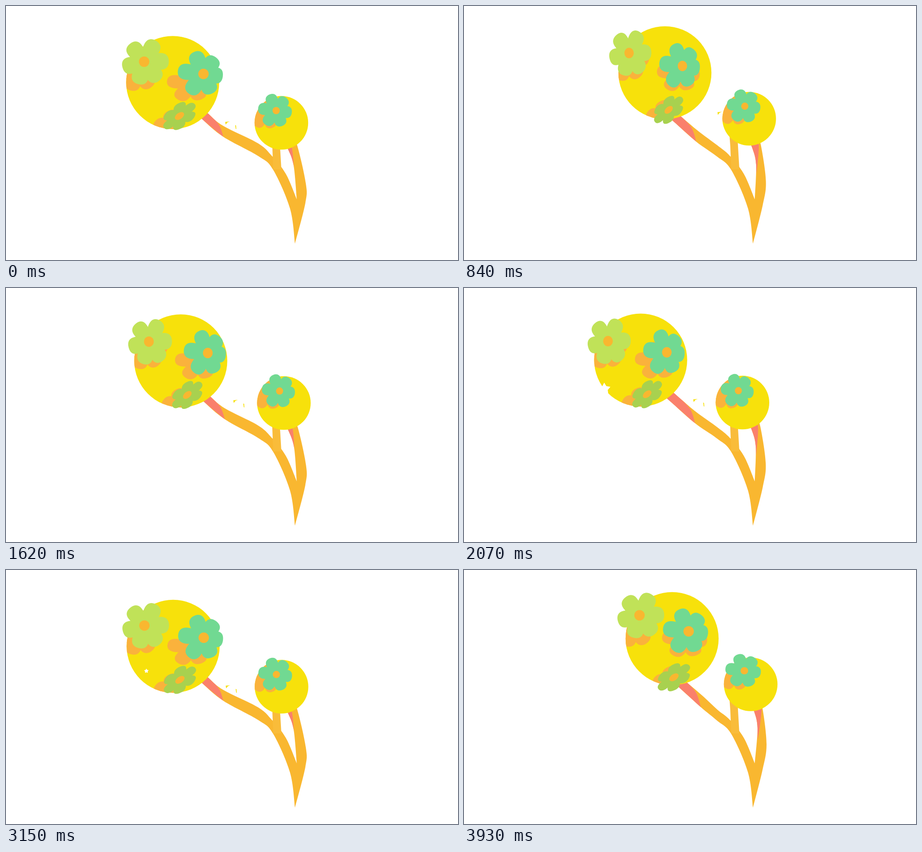
An HTML page with a canvas for the animation above (3990 ms loop, 998x561 px).

```html
<!DOCTYPE html>
<html lang="en">
<head>
<meta charset="utf-8">
<title>Swaying blossoms</title>
<style>
html, body { margin: 0; width: 100%; height: 100%; overflow: hidden; background: #fff; }
canvas { display: block; }
</style>
</head>
<body>
<canvas id="stage" width="998" height="561"></canvas>
<script>
const ctx = document.getElementById('stage').getContext('2d');
const LOOP = 3990;
const YELLOW = '#f7e10b', STEM = '#f9b730', STUB = '#f9bc3a', PINK = '#fa806c', SHADE = '#fab23c';

// Eased moves [start, end] in ms, alternately to the right and back to the left
const SWAY = [[0, 1230], [1230, 1750], [1870, 2590], [2670, 3180], [3200, 3930]];
const BEND = [[0, 1230], [1230, 1700], [1700, 2280], [2500, 3120], [3200, 3930]];
const SPARKS = [1920, 3114];

// Poses: [x, y] at the left, at the top of the arc and at the right
const BALL = [[368, 169], [426, 143], [459.5, 151.5]];
const SMALL = [[608, 258], [626, 245], [633, 252.5]];

const LIME = {
  color: '#c0e258', r: 52, turn: -8, wobble: 8, lean: -.05, dot: 11.5,
  pose: [[305, 123], [339, 108], [387.5, 100]], shade: [[288, 137], [341, 110], [371, 119]]
};
const TEAL = {
  color: '#71d992', r: 50, turn: 7, lean: .14, dot: 11.5, flat: .82,
  pose: [[436, 150], [467, 129], [496, 135.5]], shade: [[412, 171], [464, 144], [494, 153]]
};
const GREEN = {
  color: '#a8d14f', r: 43, turn: -6, lean: 0, dot: 11.5, tilt: -.61, squash: .6,
  pose: [[383, 243], [439, 221], [463.5, 237]], shade: [[360, 260], [417, 234], [451, 243]]
};
const MINI = {
  color: TEAL.color, r: 37.5, turn: 8, lean: .07, dot: 8,
  pose: [[596.5, 231], [621, 220], [619, 222.5]], shade: [[575, 235], [595, 223], [600, 229]]
};

// Stem edges: [x, y] fixed, or [x, y, x, y] from left bend to right bend
const LOWER = [[397, 214, 442, 232], [432, 249, 472, 257], [480, 289, 523, 303],
  [558, 332], [590, 362], [627, 447], [638, 525]];
const OUTER = [[638, 525], [661, 435, 659, 442], [662, 392, 668, 385], [643, 308, 659, 305], [630, 284, 650, 283]];
const INNER = [[608, 290, 628, 288], [622, 315, 640, 311], [635, 352, 648, 350], [642, 427]];
const UPPER = [[642, 427], [618, 371], [587, 331], [556, 303, 560, 309],
  [480, 265, 528, 279], [447, 238, 493, 249], [412, 203, 463, 224]];
const BLUSH = [[480, 289, 523, 303], [470, 262, 513, 272], [447, 238, 493, 249], [412, 203, 463, 224]];
const BLUSH_SMALL = [[636, 357, 649, 376], [631, 312, 657, 308], [620, 290, 650, 283]];

const mix = (a, b, k) => a + (b - a) * k;

function ease(u) {
  u = Math.min(1, Math.max(0, u));
  return u * u * (3 - 2 * u);
}

const swing = (moves, t) =>
  moves.reduce((k, [a, b], i) => k + (i % 2 ? -1 : 1) * ease((t - a) / (b - a)), 0);

// Value between three keys; s runs from 0 to 2
function pick(keys, s) {
  const i = s < 1 ? 0 : 1;
  return mix(keys[i], keys[i + 1], s - i);
}

const place = (pose, s) => [0, 1].map(axis => pick(pose.map(p => p[axis]), s));

// Closed outline: a smooth curve through each edge, sharp joins between them
function outline(k, ...edges) {
  const path = new Path2D();
  edges.forEach((edge, n) => {
    const p = edge.map(([x, y, x1 = x, y1 = y]) => [mix(x, x1, k), mix(y, y1, k)]);
    path[n ? 'lineTo' : 'moveTo'](...p[0]);
    for (let i = 1; i < p.length; i++) {
      const a = p[i - 1], b = p[i], before = p[i - 2] || a, after = p[i + 1] || b;
      path.bezierCurveTo(
        a[0] + (b[0] - before[0]) / 6, a[1] + (b[1] - before[1]) / 6,
        b[0] - (after[0] - a[0]) / 6, b[1] - (after[1] - a[1]) / 6, ...b);
    }
  });
  path.closePath();
  return path;
}

function fill(color, path) {
  ctx.fillStyle = color;
  ctx.fill(path);
}

function polygon(points) {
  const path = new Path2D();
  points.forEach(p => path.lineTo(...p));
  path.closePath();
  return path;
}

function disc([x, y], r) {
  const path = new Path2D();
  path.arc(x, y, r, 0, Math.PI * 2);
  return path;
}

function layer(draw) {
  ctx.save();
  draw();
  ctx.restore();
}

function petal(r, w) {
  const p = new Path2D();
  for (const side of [-w, w]) {
    p.moveTo(0, 0);
    p.bezierCurveTo(r * .25, side * .75, r * .4, side, r * .66, side);
    p.bezierCurveTo(r * .88, side, r, side * .65, r, 0);
    p.lineTo(0, 0);
  }
  return p;
}

// Six petals; lean lengthens those on the left, wobble crowds them
function petals({ r, turn, lean, wobble = 0, tilt = 0, squash = 1 }, color) {
  ctx.rotate(tilt);
  ctx.scale(1, squash);
  for (let deg = 0; deg < 360; deg += 60) {
    const a = (deg + turn + wobble * Math.cos((deg + 30) * Math.PI / 180)) * Math.PI / 180;
    layer(() => {
      ctx.rotate(a);
      fill(color, petal(r * (1 - lean * Math.cos(a)), r * .355));
    });
  }
}

function flower(f, s, sx) {
  layer(() => {
    ctx.translate(...place(f.pose, s));
    ctx.scale(sx, 1);
    petals(f, f.color);
    fill(STEM, disc([0, 0], f.dot));
  });
}

function shadow(f, s, sx) {
  layer(() => {
    ctx.translate(...place(f.shade, s));
    ctx.scale(sx, f.flat || 1);
    petals(f, SHADE);
  });
}

function ball(center, r, drawShadows) {
  const path = disc(center, r);
  fill(YELLOW, path);
  layer(() => {
    ctx.clip(path);
    drawShadows();
  });
}

function stems(k) {
  const body = outline(k, LOWER, OUTER, INNER, UPPER);
  fill(STEM, body);
  layer(() => {
    ctx.clip(body);
    fill(PINK, outline(k, LOWER.slice(0, 3), BLUSH));
    fill(PINK, outline(k, INNER.slice(0, 3), BLUSH_SMALL));
  });
  fill(STUB, polygon([[585, 270], [603, 270], [605, 310], [608, 361], [590, 361], [588, 310]]));
}

function specks(center) {
  layer(() => {
    ctx.translate(...center);
    fill(YELLOW, polygon([[116, 87], [126, 86], [121, 88], [117, 93]]));
    fill(YELLOW, polygon([[138, 94], [140, 95], [140.5, 103], [139, 102]]));
  });
}

function spark(age) {
  if (age < 0 || age > 300) return;
  const r = 14 * Math.sin(Math.PI * age / 300);
  fill('#fff', polygon(Array.from({ length: 10 }, (_, i) => {
    const a = i * Math.PI / 5 - 1.6, d = i % 2 ? r * .55 : r;
    return [310 + d * Math.cos(a), 223 + d * Math.sin(a)];
  })));
}

function draw(t) {
  const s = 2 * swing(SWAY, t), center = place(BALL, s);
  const narrow = pick([1, .79, 1], s);
  ctx.fillStyle = '#fff';
  ctx.fillRect(0, 0, 998, 561);
  stems(swing(BEND, t));
  specks(center);

  ball(center, 102.7, () => [LIME, TEAL, GREEN].forEach(f => shadow(f, s, mix(narrow, 1, .5))));
  SPARKS.forEach(start => spark(t - start));
  [LIME, TEAL, GREEN].forEach(f => flower(f, s, narrow));

  ball(place(SMALL, s), 59.2, () => shadow(MINI, s, 1));
  flower(MINI, s, pick([1, .93, 1.05], s));
}

const start = performance.now();
function tick() {
  draw((performance.now() - start) % LOOP);
  requestAnimationFrame(tick);
}
tick();
</script>
</body>
</html>
```
